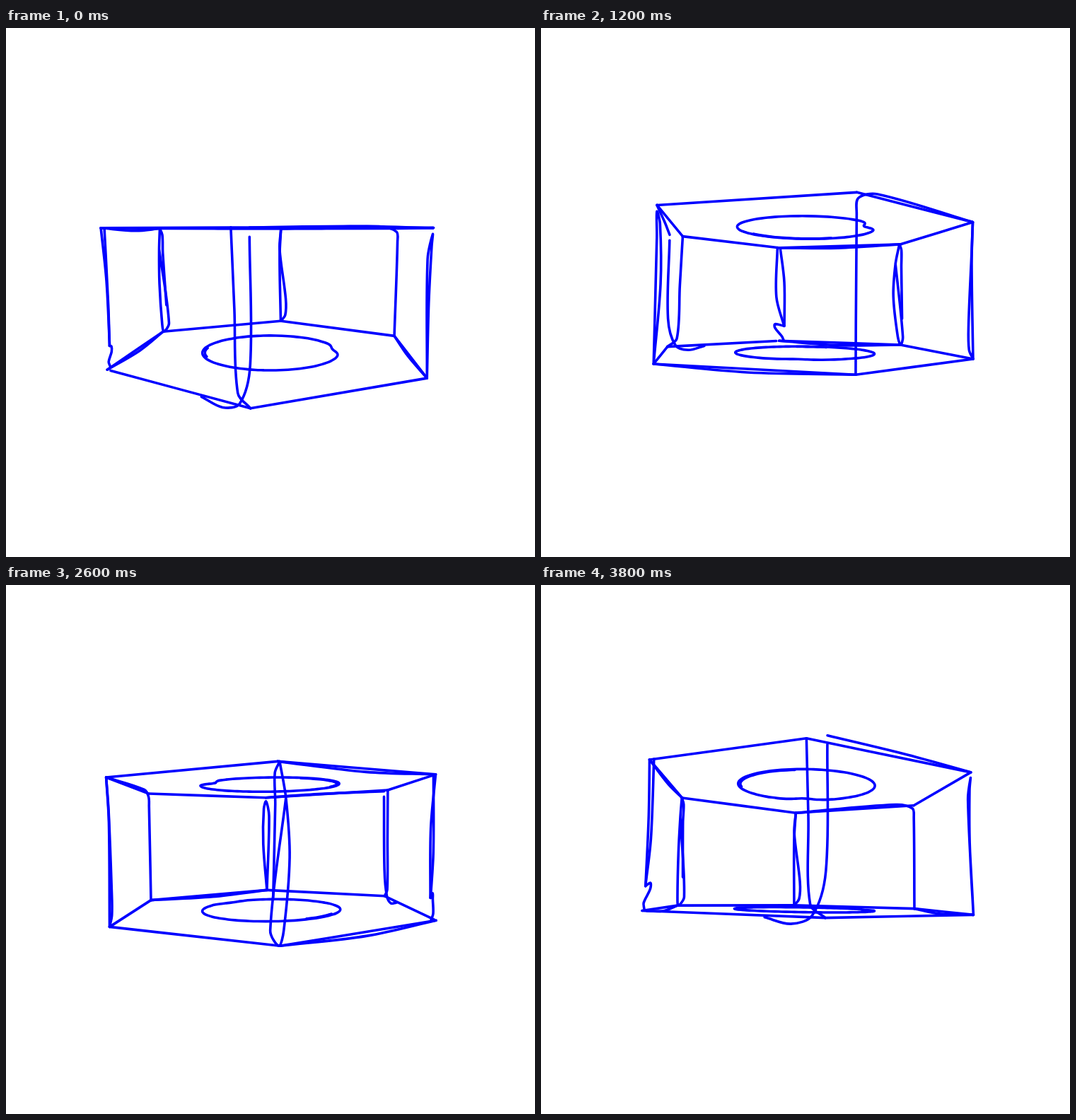
An HTML page with a canvas that plays this animation: 748 by 748 pixels, repeating every 4 s.

```html
<!DOCTYPE html>
<html lang="en">
<head>
<meta charset="utf-8">
<title>Hand-drawn nut</title>
<style>
  html, body { margin: 0; width: 100%; height: 100%; overflow: hidden; background: #fff; }
  canvas { display: block; }
</style>
</head>
<body>
<canvas id="stage" width="748" height="748"></canvas>
<script>
const ctx = document.getElementById('stage').getContext('2d');
const STEP = 200, STEPS = 20, RAD = Math.PI / 180;
const CX = 374, CY = 371, FOCAL = 670, DIST = 3, HALF = 0.39, HOLE = 0.434;

// Step, yaw in degrees, pitch and roll in milliradians; eased in between.
const poses = [
  [0, -5, 127, 0], [2, -34, 32, -36], [3, -53, -41, -25],
  [6, -107.5, -35, 10], [9, -160.5, -11, 27], [13, -238, 29, -13],
  [16, -293, 8, -43], [18, -333, -34, -10], [19, -355, -97, 16]
];

// Uprights: pairs of sideways shift and height, in percent of a side.
const uprights = [
  [[-10, 0, -8.5, 45, -7, 93, 0, 100], [0, 5, 0, 75, -6, 99, -16, 104, -29, 101]],
  [[0, 100, -3, 20, -0.3, 4, 2, 12, 3, 50, 0, 100]],
  [[0, 100, 0, 12, 1, 3, 14, -2, 100, 0]],
  [[0, 0, 1.2, 22, -5, 75, -4.5, 93, 0, 100], [0, 0, 1.2, 30, 0, 100]],
  [[1, 0, -1.4, 6, -1.4, 23, -3, 74],
   [1, 0, 4, 20, 5.5, 52, 2, 92, -0.5, 100, -4.6, 92, 4, 19]],
  [[0, 0, -4, 37, -4.5, 84], [3, 0, 3.5, 53, -4.3, 84],
   [-4.3, 84, 4.6, 82, 4.6, 86, -2.3, 95, -4, 99]]
];

// Sides drawn a second time: corner, height, bow.
const doubled = [[0, 0, -0.8], [1, 100, 2], [4, 0, 2], [4, 100, 2.6]];

function corner(i) {
  const a = i * 60 * RAD;
  return [Math.sin(a), Math.cos(a)];
}

// Point on the wall; s runs round the hexagon, u from top to bottom.
function wall(s, u) {
  const i = Math.floor(s), m = s - i, a = corner(i), b = corner(i + 1);
  return [a[0] + (b[0] - a[0]) * m, (2 * u - 1) * HALF, a[1] + (b[1] - a[1]) * m];
}

function wallStroke(i, list) {
  const pts = [];
  for (let n = 0; n < list.length; n += 2) pts.push(wall(i + list[n] / 100, list[n + 1] / 100));
  return pts;
}

function ring(y, from, to, dentAt, dent, inset) {
  const pts = [];
  for (let a = from; a <= to; a += 6) {
    const d = (a - dentAt) / 13;
    const r = HOLE - inset - dent * Math.exp(-d * d);
    pts.push([r * Math.sin(a * RAD), y, r * Math.cos(a * RAD)]);
  }
  return pts;
}

const strokes = uprights.flatMap((set, i) => set.map(list => wallStroke(i, list)));
for (let i = 0; i < 6; i++) {
  // One top corner leans out of line.
  strokes.push(wallStroke(i, [i === 0 ? -10 : 0, 0, i === 5 ? 90 : 100, 0]));
  strokes.push(wallStroke(i, [i === 5 ? 3 : 0, 100, 100, 100]));
}
for (const [i, u, bow] of doubled) strokes.push(wallStroke(i, [0, u, 50, u + bow, 100, u]));
strokes.push(
  ring(-HALF, 0, 360, 178, 0.06, 0), ring(-HALF, 262, 346, 178, 0, 0.014),
  ring(HALF, 0, 360, 100, 0.03, 0), ring(HALF, 266, 296, 100, 0, 0.016));

// Cubic blend through the key poses.
function poseAt(k) {
  let n = 0;
  while (n < poses.length - 2 && poses[n + 1][0] <= k) n++;
  const a = poses[n], b = poses[n + 1], h = b[0] - a[0], t = (k - a[0]) / h;
  const before = poses[n - 1] || a, after = poses[n + 2] || b;
  return [1, 2, 3].map(c => {
    const ta = (b[c] - before[c]) / (b[0] - before[0]) * h;
    const tb = (after[c] - a[c]) / (after[0] - a[0]) * h;
    const s = t * t * (3 - 2 * t);
    return a[c] + (b[c] - a[c]) * s + ta * t * (1 - t) * (1 - t) - tb * t * t * (1 - t);
  });
}

function camera(k) {
  const [yaw, pitch, roll] = poseAt(k);
  const [sy, cy, sp, cp, sr, cr] =
    [yaw * RAD, pitch / 1000, roll / 1000].flatMap(v => [Math.sin(v), Math.cos(v)]);
  return ([px, py, pz]) => {
    const x = px * cy + pz * sy, z = pz * cy - px * sy;
    const v = py * cp + z * sp;
    const scale = FOCAL / (DIST - z * cp + py * sp);
    return [CX + (x * cr - v * sr) * scale, CY + (x * sr + v * cr) * scale];
  };
}

const gap = (a, b) => Math.hypot(b[0] - a[0], b[1] - a[1]);

// Smooth curve through all points, handles scaled to the spacing.
function curve(p) {
  ctx.beginPath();
  ctx.moveTo(...p[0]);
  for (let i = 0; i < p.length - 1; i++) {
    const a = p[i - 1] || p[i], b = p[i], c = p[i + 1], d = p[i + 2] || c;
    const len = gap(b, c) / 3;
    const f = len / (gap(a, b) + gap(b, c) || 1), g = len / (gap(b, c) + gap(c, d) || 1);
    ctx.bezierCurveTo(
      b[0] + (c[0] - a[0]) * f, b[1] + (c[1] - a[1]) * f,
      c[0] - (d[0] - b[0]) * g, c[1] - (d[1] - b[1]) * g, c[0], c[1]);
  }
  ctx.stroke();
}

function draw(k) {
  ctx.fillStyle = '#fff';
  ctx.fillRect(0, 0, 748, 748);
  ctx.strokeStyle = '#00f';
  ctx.lineWidth = 3.6;
  ctx.lineCap = ctx.lineJoin = 'round';
  const project = camera(k);
  for (const s of strokes) curve(s.map(project));
}

const start = performance.now();
function tick() {
  draw(Math.floor((performance.now() - start) / STEP) % STEPS);
  requestAnimationFrame(tick);
}
tick();
</script>
</body>
</html>
```
